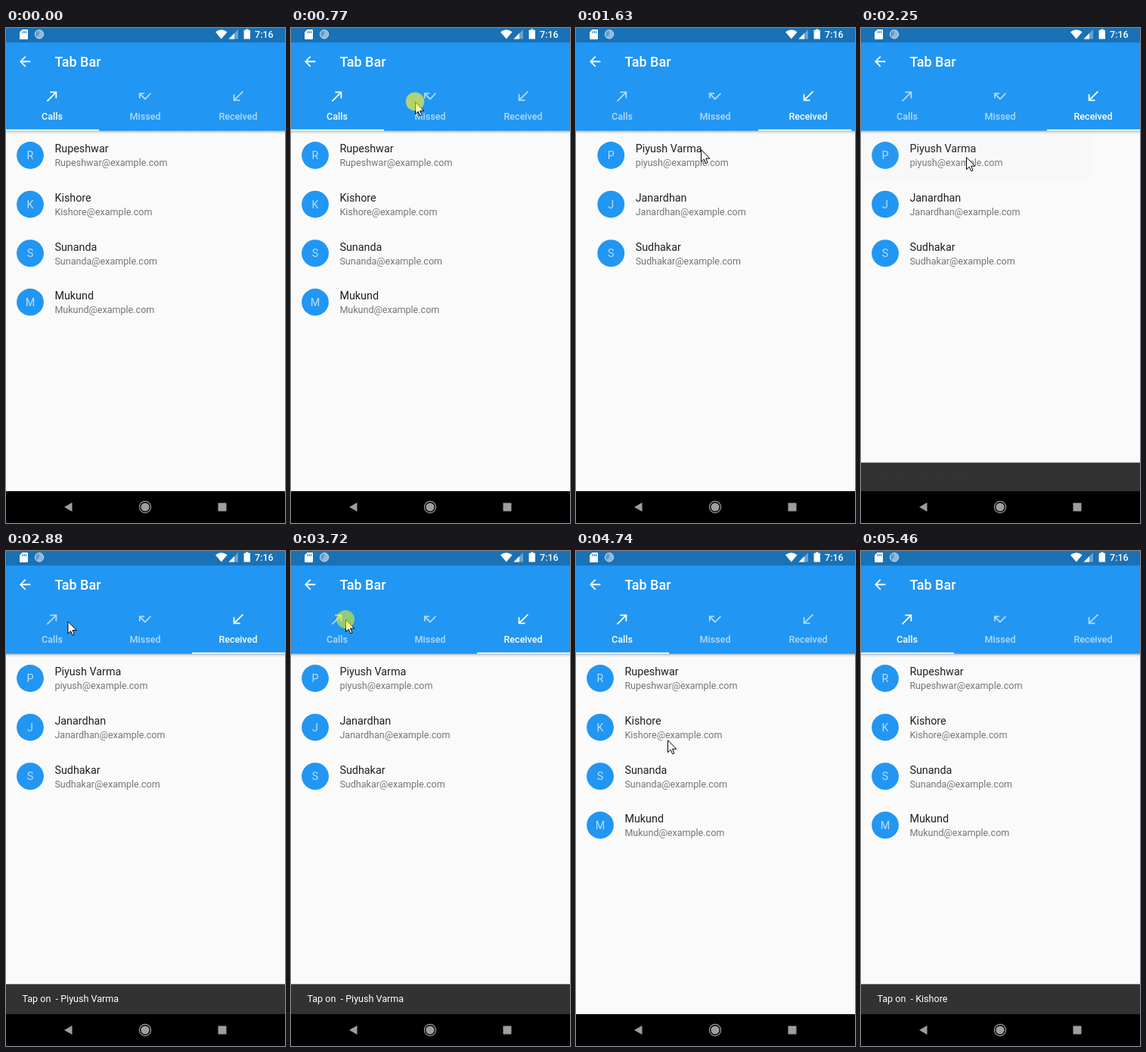
Write an HTML page that moves like this. It is 369x653 px and loops after 6380 ms.

```html
<!DOCTYPE html>
<html lang="en">
<head>
<meta charset="utf-8">
<title>Tab Bar</title>
<style>
  html, body { margin: 0; width: 100%; height: 100%; overflow: hidden; background: #fafafa; }
  svg { display: block; width: 100%; height: 100%; }
  text { font-family: Roboto, sans-serif; font-size: 12.56px; white-space: pre; }
  .medium { font-weight: 500; fill: #fff; }
  .name { font-size: 14.35px; fill: #212121; }
  .mail { fill: #757575; }
  .initial { font-size: 14.35px; fill: #bbdefb; text-anchor: middle; }
</style>
</head>
<body>
<svg id="stage" viewBox="0 0 369 653">
  <defs>
    <linearGradient id="shade" x2="0" y2="1">
      <stop stop-color="#000" stop-opacity=".3"/>
      <stop offset=".4" stop-color="#000" stop-opacity=".1"/>
      <stop offset="1" stop-color="#000" stop-opacity="0"/>
    </linearGradient>
    <clipPath id="body"><rect y="135.7" width="369" height="475.3"/></clipPath>
    <clipPath id="inkArea"><rect id="inkRect"/></clipPath>
  </defs>
  <rect width="369" height="653" fill="#fafafa"/>
  <g id="pages" clip-path="url(#body)"></g>
  <rect y="135.7" width="369" height="4.5" fill="url(#shade)"/>

  <rect width="369" height="135.7" fill="#2196f3"/>
  <rect width="369" height="19.1" fill="#1971b6"/>
  <g fill="#fff">
    <path d="M21.5 2H28a1 1 0 0 1 1 1V14a1 1 0 0 1-1 1H19a1 1 0 0 1-1-1V5.5Z"/>
    <path d="M22 4v3M24.3 4v3M26.6 4v3" stroke="#1971b6"/>
    <circle cx="44" cy="8.3" r="5.7" fill="#8fb9dc" stroke="#c6dced"/>
    <path d="M44 8.3V3.5A4.8 4.8 0 0 0 40.6 11.7Z" fill="#5d9bcc"/>
    <path d="M277 5.2Q284.8-.9 292.6 5.2L284.8 14.6Z"/>
    <path d="M307 2V14.5H294.5Z" opacity=".35"/>
    <path d="M302 7V14.5H294.5Z"/>
    <path d="M317 1.5h3.6v1.3H323V14.5h-8.4V2.8H317Z"/>
  </g>
  <text class="medium" x="329" y="13.3">7:16</text>
  <path fill="#fff" transform="translate(14.4 33.5) scale(.897)"
    d="M20 11H7.83l5.59-5.59L12 4l-8 8 8 8 1.41-1.41L7.83 13H20z"/>
  <text class="medium" x="64.4" y="50.8" style="font-size:17.94px">Tab Bar</text>
  <g id="tabs"></g>
  <rect id="indicator" y="133.8" width="123" height="1.9" fill="#fff"/>
  <g clip-path="url(#inkArea)"><circle id="ink" fill="#c8c8c8"/></g>

  <g clip-path="url(#body)">
    <g id="snack">
      <rect width="369" height="42" fill="#323232"/>
      <text id="message" x="21.5" y="23.9" fill="#fff"></text>
    </g>
  </g>

  <rect y="611" width="369" height="42" fill="#000"/>
  <g fill="#9e9e9e">
    <path d="M77 632l10.5-6V638Z"/>
    <circle cx="184" cy="632" r="5.6"/>
    <circle cx="184" cy="632" r="7.6" fill="none" stroke="#9e9e9e" stroke-width="1.2"/>
    <rect x="280.5" y="626.5" width="11" height="11" rx=".8"/>
  </g>

  <path id="cursor" fill="#fff" stroke="#000"
    d="M.5.7V16.7L4.2 13.2 6.7 18.8 9 17.8 6.6 12.2H11.8Z"/>
  <circle id="press" r="12" fill="#ff0" opacity=".5"/>
</svg>
<script>
const $ = id => document.getElementById(id);
const clamp = v => Math.min(1, Math.max(0, v));
const LOOP = 6380, STEP = 77.8;
const WIDTH = 369, TAB = 123, TOP = 135.7, BOTTOM = 611, ROW = 64.57, SNACK = 39.6;

function bezier(x1, y1, x2, y2) {
  const at = (a, b, s) => 3 * (1 - s) ** 2 * s * a + 3 * (1 - s) * s * s * b + s ** 3;
  return x => {
    if (x <= 0 || x >= 1) return clamp(x);
    let lo = 0, hi = 1;
    for (let i = 0; i < 24; i++) {
      const mid = (lo + hi) / 2;
      if (at(x1, x2, mid) < x) lo = mid; else hi = mid;
    }
    return at(y1, y2, lo);
  };
}
const ease = bezier(.25, .1, .25, 1);
const fastOutSlowIn = bezier(.4, 0, .2, 1);

const callers = ['Rupeshwar', 'Kishore', 'Sunanda', 'Mukund'];
const recent = ['Piyush Varma', 'Janardhan', 'Sudhakar'];
const lists = [callers, [...recent, 'Niranjan', 'Suresh', ...callers], recent];
const mail = name => (name.includes(' ') ? name.split(' ')[0].toLowerCase() : name) + '@example.com';

const row = (name, i) => `<g transform="translate(0 ${TOP + i * ROW})">
  <circle cx="32" cy="32.3" r="17.9" fill="#2196f3"/>
  <text class="initial" x="32" y="37.4">${name[0]}</text>
  <text class="name" x="64.4" y="28.8">${name}</text>
  <text class="mail" x="64.4" y="46.7">${mail(name)}</text></g>`;
$('pages').innerHTML = lists.map(list => `<g>${list.map(row).join('')}</g>`).join('');

const tabs = [
  ['Calls', 'M9 5v2h6.59L4 18.59 5.41 20 17 8.41V15h2V5z'],
  ['Missed', 'M19.59 7L12 14.59 6.41 9H11V7H3v8h2v-4.59l7 7 9-9z'],
  ['Received', 'M20 5.41L18.59 4 7 15.59V9H5v10h10v-2H8.41z']
];
$('tabs').innerHTML = tabs.map(([label, icon], i) => `<g transform="translate(${(i + .5) * TAB - .5})">
  <path fill="#fff" transform="translate(-10.8 79.3) scale(.897)" d="${icon}"/>
  <text class="medium" y="121.3" text-anchor="middle">${label}</text></g>`).join('');

// A tap is held from `down` to `up`; it selects a tab or a list row.
const taps = [
  { down: 615, up: 777, tab: 1 },
  { down: 1235, up: 1402, tab: 2 },
  { down: 1930, up: 2068, row: 0, name: recent[0], hide: 3818 },
  { down: 3725, up: 3895, tab: 0 },
  { down: 4812, up: 4960, name: callers[1], hide: Infinity }
];
const path = [
  [70, 301, 496], [540, 164, 97], [780, 164, 97], [1005, 295, 107], [1400, 295, 107],
  [1628, 165, 160], [1705, 139, 170], [2260, 139, 170], [2562, 115, 101], [2960, 72, 90],
  [3890, 72, 90], [4350, 118, 214], [4650, 121, 249], [5130, 121, 249], [5370, 372, 330]
];

function pointerAt(t) {
  const next = path.findIndex(p => p[0] > t);
  if (next < 1) return null;
  const [a, b] = [path[next - 1], path[next]];
  const k = (t - a[0]) / (b[0] - a[0]);
  return [a[1] + (b[1] - a[1]) * k, a[2] + (b[2] - a[2]) * k];
}

function set(el, attrs) {
  for (const key in attrs) el.setAttribute(key, attrs[key]);
}
const show = (el, on) => set(el, { display: on ? 'inline' : 'none' });

function drawTabs(t) {
  let from = 0, to = 0, k = 1;
  for (const tap of taps) {
    if (tap.tab === undefined || t < tap.up) continue;
    from = to;
    to = tap.tab;
    k = ease((t - tap.up) / 300);
  }
  const side = Math.sign(to - from);
  [...$('pages').children].forEach((page, i) => {
    show(page, i === to || (i === from && k < 1));
    const x = i === to ? side * (1 - k) : -side * k;
    set(page, { transform: `translate(${x * WIDTH})` });
  });
  [...$('tabs').children].forEach((tab, i) => {
    const lit = i === to ? k : i === from ? 1 - k : 0;
    set(tab, { opacity: .65 + .35 * lit });
  });
  set($('indicator'), { x: (from + (to - from) * k) * TAB });
}

function drawInk(t) {
  const tap = taps.find(p => t >= p.up - 10 && t < p.up + 220 && (p.tab ?? p.row) !== undefined);
  show($('ink'), tap);
  if (!tap) return;
  const k = clamp((t - tap.up + 10) / 225);
  const [cx, cy] = pointerAt(tap.down);
  const onTab = tap.tab !== undefined;
  set($('ink'), { cx, cy, r: 10 + (onTab ? 110 : 184) * k, opacity: (onTab ? .4 : .25) * (1 - k) });
  set($('inkRect'), onTab
    ? { x: tap.tab * TAB, y: 69.3, width: TAB, height: TOP - 69.3 }
    : { x: 0, y: TOP + tap.row * ROW, width: WIDTH, height: ROW });
}

function drawSnack(t) {
  const tap = taps.find(p => p.name && t >= p.up && t < p.hide + 250);
  show($('snack'), tap);
  if (!tap) return;
  const shown = clamp((t - tap.up) / 250);
  const left = clamp((t - tap.hide) / 250);
  set($('snack'), { transform: `translate(0 ${BOTTOM - SNACK * fastOutSlowIn(shown - left)})` });
  $('message').textContent = `Tap on  - ${tap.name}`;
  set($('message'), { opacity: fastOutSlowIn((shown - .72) / .28) });
}

function drawPointer(t) {
  const at = pointerAt(t);
  show($('cursor'), at);
  show($('press'), at && taps.some(p => t >= p.down && t < p.up));
  if (at) for (const id of ['cursor', 'press']) set($(id), { transform: `translate(${at})` });
}

function render(ms) {
  // The screen refreshes in even steps.
  const t = Math.floor((ms % LOOP + 16) / STEP) * STEP - 6;
  drawTabs(t);
  drawInk(t);
  drawSnack(t);
  drawPointer(t);
}

const start = performance.now();
function frame() {
  render(performance.now() - start);
  requestAnimationFrame(frame);
}
frame();
</script>
</body>
</html>
```
